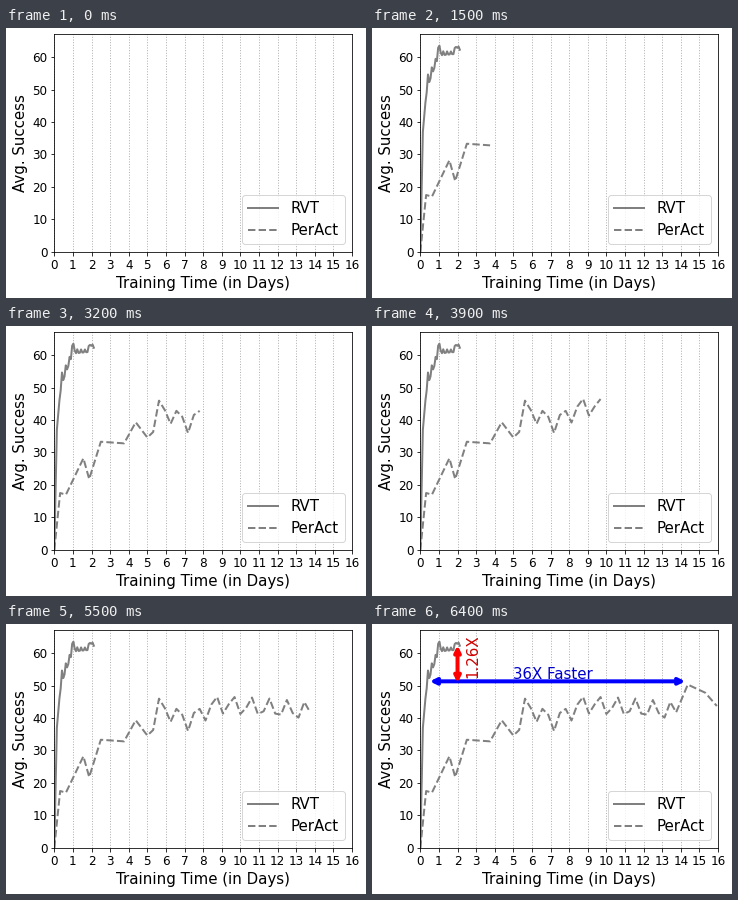
These frames come from a looping animation (360x270 px, 6.5 s). A matplotlib script:

```python
import numpy as np
import matplotlib.pyplot as plt
from matplotlib.animation import FuncAnimation

W, H, DPI = 360, 270, 72
FRAMES, INTERVAL = 65, 100
DAYS_PER_FRAME = 0.25

plt.rcParams["font.family"] = "DejaVu Sans"


def learning_curve(keys, steps, amplitude, period, peak):
    """Straight trend through the key points plus a regular ripple."""
    trend = np.interp(steps, *zip(*keys))
    return trend + amplitude * np.cos(2 * np.pi * (steps - peak) / period)


# A steep climb, then a plateau with a fading ripple.
steps = np.arange(32)
rvt_days = 0.0685 * steps
rvt = learning_curve(
    [(0, 0), (2, 37), (4, 46), (6, 52.3), (13, 59.3), (14, 63.4), (17, 61),
     (26, 61.2), (28, 63.4), (31, 62.5)],
    steps, np.where(steps >= 6, 14 / np.maximum(steps, 1), 0), 3, 6)

# A slow climb, then a steady ripple; one evaluation is missing.
steps = np.delete(np.arange(52), 45)
peract_days = 0.3125 * steps
peract = learning_curve(
    [(0, 0), (1, 17.5), (2, 17), (5, 28.2), (6, 21.8), (8, 33.3), (12, 32.8),
     (14, 39.3), (16, 34.6), (17, 36.3), (18, 43.5), (23, 39), (28, 44.3),
     (44, 42), (46, 50.3), (49, 47.8), (51, 43.7)],
    steps, np.where((steps >= 18) & (steps <= 44), 3, 0), 3.11, 18.3)

fig = plt.figure(figsize=(W / DPI, H / DPI), dpi=DPI, facecolor="white")
left, right, top, bottom = 48.32, 346, 6.4, 223.78
ax = fig.add_axes([left / W, 1 - bottom / H, (right - left) / W, (bottom - top) / H])
ax.set_xlim(0, 16)
ax.set_ylim(0, 67)
ax.set_xticks(range(17))
ax.set_yticks(range(0, 61, 10))
ax.tick_params(labelsize=12)
ax.grid(axis="x", linestyle=":", linewidth=1)
ax.set_xlabel("Training Time (in Days)", fontsize=15)
ax.set_ylabel("Avg. Success", fontsize=15)

rvt_line, = ax.plot([], [], color="gray", lw=2, label="RVT")
peract_line, = ax.plot([], [], color="gray", lw=2, ls="--", label="PerAct")
ax.legend(loc="lower right", fontsize=15)


def double_arrow(start, end, color):
    return ax.annotate("", xy=end, xytext=start, fontsize=12,
                       arrowprops=dict(arrowstyle="<->", color=color, lw=4))


notes = [
    double_arrow((0.4, 51.3), (14.35, 51.3), "blue"),
    double_arrow((2, 50.2), (2, 63), "red"),
    ax.text(5, 52, "36X Faster", color="mediumblue", fontsize=15),
    ax.text(2.4, 53.3, "1.26X", color="#d00000", fontsize=15, rotation=90),
]


def reveal(line, days, values, now):
    shown = days <= now + 1e-9
    line.set_data(days[shown], values[shown])


def update(frame):
    now = frame * DAYS_PER_FRAME
    reveal(rvt_line, rvt_days, rvt, now)
    reveal(peract_line, peract_days, peract, now)
    for note in notes:
        note.set_visible(frame == FRAMES - 1)
    return [rvt_line, peract_line, *notes]


anim = FuncAnimation(fig, update, frames=FRAMES, interval=INTERVAL,
                     repeat=True, repeat_delay=0, blit=False)
plt.show()
```
